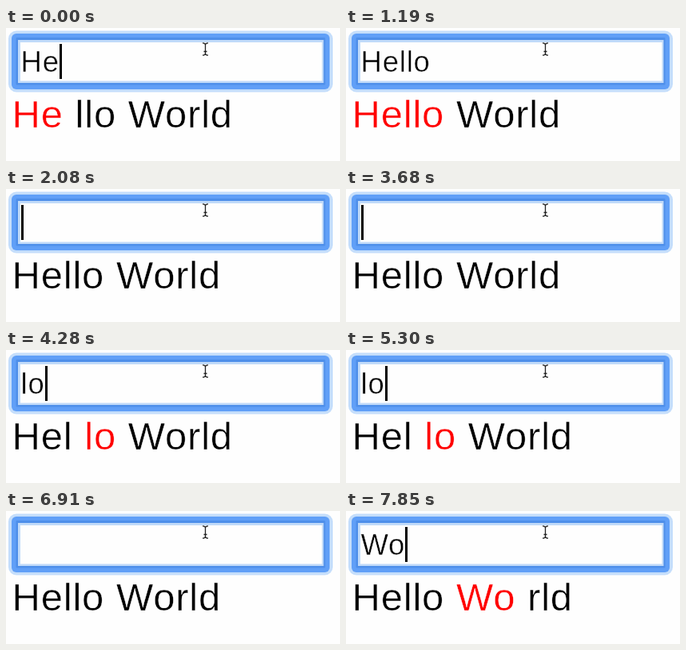
Write an HTML page that moves like this. It is 418 by 167 pixels and loops after 8000 ms.

```html
<!DOCTYPE html>
<html lang="en">
<head>
<meta charset="utf-8">
<title>Search highlight</title>
<style>
  html, body { margin: 0; width: 100%; height: 100%; overflow: hidden; background: #fefefe; }
  body { position: relative; color: #000; font-family: "Liberation Sans", Arial, sans-serif; }
  svg { position: absolute; left: 0; top: 0; }
  /* a thin background-coloured stroke lightens the letter weight */
  .line { position: absolute; white-space: nowrap; -webkit-text-stroke: .5px #fefefe; }
  #field { left: 18.5px; top: 20px; font-size: 36.5px; line-height: 46px; letter-spacing: .8px; }
  #result { left: 7.5px; top: 77.5px; font-size: 49px; line-height: 60px; letter-spacing: .8px; word-spacing: .4px; }
  #result span { color: #f00; }
  #caret { position: absolute; top: 0; width: 3px; height: 44px; background: #000; }
</style>
</head>
<body>
<svg width="418" height="167" viewBox="0 0 418 167">
  <rect x="3" y="3.5" width="406" height="77" rx="10" fill="#c5defb"/>
  <rect x="7" y="7" width="398" height="70" rx="6" fill="#609ff7"/>
  <rect x="12.5" y="12" width="387" height="59.5" rx="1" fill="#4e8fea"/>
  <rect x="15" y="15" width="382.5" height="54" fill="#c0daf9"/>
  <rect x="18" y="18" width="377.5" height="48.5" fill="#fefefe"/>
  <path d="M246 18.8Q249.5 18.8 249.5 21.5Q249.5 18.8 253 18.8M249.5 21V32M246 34.2Q249.5 34.2 249.5 31.5Q249.5 34.2 253 34.2M247.5 29.5H251.5"
        fill="none" stroke="#222" stroke-width="1.3"/>
</svg>
<div id="field" class="line"><span id="typed"></span><span id="caret"></span></div>
<div id="result" class="line"></div>
<script>
const LOOP = 8000, TEXT = 'Hello World';
// [start ms, field contents]; a trailing bar means the caret is lit
const steps = [
  [0, 'He|'], [300, 'Hel|'], [410, 'Hell|'], [710, 'Hello|'], [1190, 'Hello'],
  [1480, 'Hell'], [1660, 'Hel|'], [1780, 'He|'], [1900, 'H|'],
  [2080, '|'], [2200, ''], [2680, '|'], [3150, ''], [3680, '|'],
  [3860, 'l|'], [4280, 'lo|'], [4820, 'lo'], [5300, 'lo|'], [5420, 'l|'],
  [5600, '|'], [5770, ''], [6310, '|'], [6370, 'w|'], [6850, 'w'], [6910, ''],
  [7080, 'W|'], [7560, 'W'], [7850, 'Wo|']
];
const [typed, caret, result] = ['typed', 'caret', 'result'].map(id => document.getElementById(id));
const began = performance.now();
let shown = null;

const highlight = query =>
  query ? TEXT.split(query).join(` <span>${query}</span> `) : TEXT;

function show(value) {
  if (value === shown) return;
  shown = value;
  const query = value.replace('|', '');
  typed.textContent = query;
  caret.style.visibility = value.endsWith('|') ? 'visible' : 'hidden';
  result.innerHTML = highlight(query);
}

function tick(now) {
  const t = Math.max(0, now - began) % LOOP;
  show(steps.findLast(([start]) => start <= t)[1]);
  requestAnimationFrame(tick);
}

tick(began);
</script>
</body>
</html>
```
